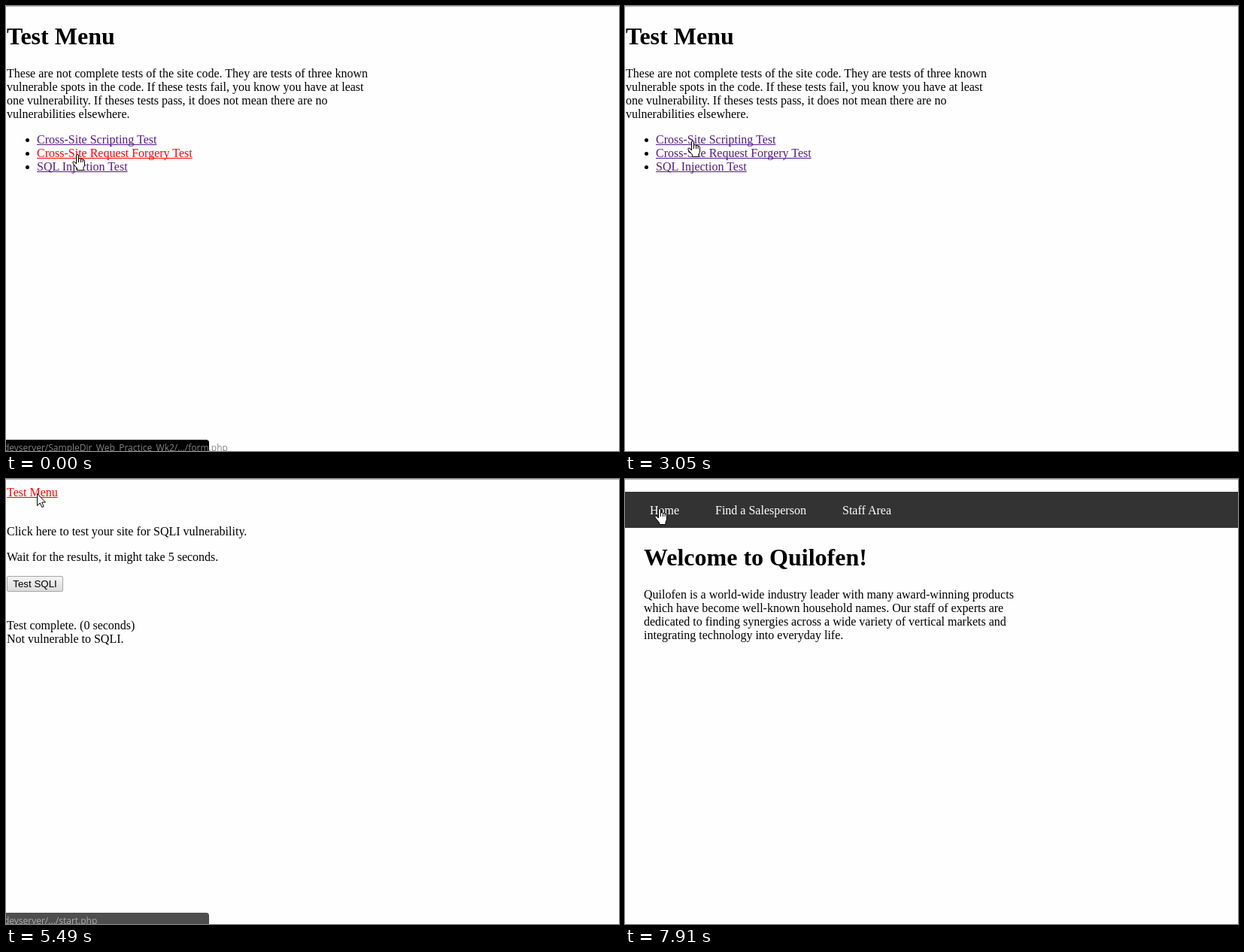
Write an HTML page that moves like this. It is 815 px wide and 592 px high and loops after 8 s.

```html
<!DOCTYPE html>
<html lang="en">
<head>
<meta charset="utf-8">
<title>Vulnerability test walkthrough</title>
<style>
  html, body { margin: 0; width: 100%; height: 100%; overflow: hidden; background: #fefefe; }
  #stage { position: relative; width: 815px; height: 592px; overflow: hidden; background: #fefefe;
    font: 16px/18px "Liberation Serif", serif; color: #000; white-space: nowrap; }
  #stage > *, .page > * { position: absolute; margin: 0; }
  .page { inset: 0; visibility: hidden; }
  .page.on { visibility: visible; }
  #topline { left: 0; top: 0; width: 100%; height: 1px; background: #b1b1b1; }
  h1 { font-size: 32px; line-height: 37px; }
  a { color: #551a8b; text-decoration: underline; text-decoration-skip-ink: none; }
  a.active { color: #f00; }
  li { list-style: none; position: relative; }
  li::before { content: ""; position: absolute; left: -15px; top: 7px; width: 5px; height: 5px; border-radius: 50%; background: #000; }
  .button { box-sizing: border-box; height: 21px; border: 1px solid #a6a6a6; border-radius: 2px;
    font: 13.333px/19px "Liberation Sans", sans-serif; text-align: center;
    background: linear-gradient(#f4f4f4, #dcdcdc); }
  .button.hover { border-color: #8c8c8c; background: linear-gradient(#f0f0f0, #e2e2e2); }
  .button.press { border-color: #8c8c8c; background: linear-gradient(#dcdcdc, #ececec); }
  nav { left: 0; top: 17px; width: 100%; height: 48px; background: #333; color: #fff; }
  nav span { position: absolute; top: 16px; }
  #status { left: 0; top: 577px; width: 270px; height: 20px; border-radius: 0 4px 0 0; background: #000;
    color: #858585; font: 12px/17px "Open Sans", sans-serif; }
  #status span { position: absolute; left: -3px; top: 2px; }
  #cursor { left: 0; top: 0; width: 20px; height: 24px; overflow: visible; }
  #cursor path { fill: #fff; stroke: #000; display: none; }
  #cursor path.on { display: inline; }
</style>
</head>
<body>
<div id="stage">
  <div class="page" id="menu">
    <h1 style="left:1px;top:22px">Test Menu</h1>
    <p style="left:1px;top:81px">These are not complete tests of the site code. They are tests of three known<br>vulnerable spots in the code. If these tests fail, you know you have at least<br>one vulnerability. If theses tests pass, it does not mean there are no<br>vulnerabilities elsewhere.</p>
    <ul style="left:41px;top:169px;padding:0">
      <li><a>Cross-Site Scripting Test</a></li>
      <li><a id="csrfLink">Cross-Site Request Forgery Test</a></li>
      <li><a id="sqliLink">SQL Injection Test</a></li>
    </ul>
  </div>
  <div class="page" id="csrf">
    <a class="back" style="left:1px;top:9px">Test Menu</a>
    <p style="left:1px;top:61px">Click here to test your site for CSRF vulnerability.</p>
    <div class="button" style="left:1px;top:95px;width:82px">Test CSRF</div>
    <p class="result" style="left:1px;top:152px">CSRF has not succeeded.</p>
  </div>
  <div class="page" id="sqli">
    <a class="back" style="left:1px;top:9px">Test Menu</a>
    <p style="left:1px;top:61px">Click here to test your site for SQLI vulnerability.</p>
    <p style="left:1px;top:95px">Wait for the results, it might take 5 seconds.</p>
    <div class="button" style="left:1px;top:129px;width:75px">Test SQLI</div>
    <p class="result" style="left:1px;top:186px">Test complete. (0 seconds)<br>Not vulnerable to SQLI.</p>
  </div>
  <div class="page" id="home">
    <nav><span style="left:33px">Home</span><span style="left:120px">Find a Salesperson</span><span style="left:289px">Staff Area</span></nav>
    <h1 style="left:25px;top:86px">Welcome to Quilofen!</h1>
    <p style="left:25px;top:145px">Quilofen is a world-wide industry leader with many award-winning products<br>which have become well-known household names. Our staff of experts are<br>dedicated to finding synergies across a wide variety of vertical markets and<br>integrating technology into everyday life.</p>
  </div>
  <div id="topline"></div>
  <div id="status"><span></span></div>
  <svg id="cursor">
    <path id="arrow" d="M.5.5V16.5L4.3 12.9 6.8 18.5 9.2 17.5 6.8 12H11.5Z"/>
    <path id="hand" d="M5.5 13V2q0-1.5 1.5-1.5T8.5 2V6q1.7-1 3 .6q1.7-.8 2.6.7q2.4-.5 2.4 2V14q0 2-1.5 4V21.5H6.5V19L2 13.5q-2.5-3.2 0-3.5q1.5 0 3.5 3M8.5 6v5M11.5 6.6v4.4M14.1 7.3v3.7"/>
    <path id="beam" d="M0 .5H3M4 .5H7M3.5 1V15M0 15.5H3M4 15.5H7"/>
  </svg>
</div>
<script>
const LOOP = 8000;
const $ = id => document.getElementById(id);
const all = selector => document.querySelectorAll(selector);

// Every track lists [start time, ...values]; values hold until the next entry.
const pages = [[0, "menu"], [120, "csrf"], [2660, "menu"], [3680, "sqli"], [5610, "menu"], [6810, "home"]];
const activeLinks = [[0, "csrfLink"], [120, ""], [2540, "back"], [2660, ""], [3560, "sqliLink"], [3680, ""], [5490, "back"], [5610, ""]];
const buttons = [[0, ""], [640, "hover"], [790, "press"], [910, "hover"], [1190, ""],
  [4160, "hover"], [4400, "press"], [4550, "hover"], [5220, ""]];
const results = [[0, false], [910, true], [2660, false], [4550, true], [5610, false]];

const HALF = 0.69;
const formPath = "devserver/SampleDir_Web_Practice_Wk2/.../form.php";
const startPath = "devserver/.../start.php";
const queryPath = "devserver/.../query.php";
const statuses = [[0, 1, formPath], [400, HALF, formPath], [520, 0, ""],
  [2420, HALF, startPath], [2540, 1, startPath], [2930, HALF, startPath], [3050, 0, ""],
  [3290, HALF, queryPath], [3440, 1, queryPath], [4160, HALF, queryPath], [4280, 0, ""],
  [5490, HALF, startPath], [5610, 1, startPath], [5980, HALF, startPath], [6100, 0, ""],
  [7640, 1, startPath], [7790, HALF, startPath], [7910, 0, ""]];

const cursors = [[0, "hand", 88, 197], [120, "arrow", 94, 197], [400, "arrow", 86, 170], [520, "arrow", 70, 130],
  [640, "arrow", 61, 108], [1190, "arrow", 57, 44], [1340, "arrow", 57, 36], [1460, "arrow", 56, 28],
  [1730, "arrow", 56, 27], [1880, "hand", 54, 9], [2000, "arrow", 56, 26], [2150, "arrow", 80, 62],
  [2270, "arrow", 99, 100], [2420, "hand", 54, 18], [2660, "arrow", 60, 18], [2780, "arrow", 62, 39],
  [2930, "arrow", 78, 110], [3050, "hand", 83, 179], [3170, "hand", 82, 196], [3290, "hand", 80, 208],
  [3680, "arrow", 86, 208], [3920, "arrow", 70, 180], [4040, "arrow", 54, 150], [4160, "arrow", 48, 134],
  [4280, "arrow", 48, 133], [4950, "arrow", 48, 136], [5070, "arrow", 48, 133], [5220, "arrow", 44, 70],
  [5340, "arrow", 42, 20], [5490, "arrow", 41, 19], [5860, "beam", 47, 16], [6380, "", 0, 0],
  [7090, "arrow", 325, 16], [7210, "arrow", 240, 72], [7330, "arrow", 153, 54], [7490, "arrow", 128, 49],
  [7640, "hand", 42, 42], [7790, "hand", 39, 39]];

const at = (track, time) => track.findLast(entry => entry[0] <= time).slice(1);

function draw(now) {
  const time = now % LOOP;
  const [page] = at(pages, time);
  const [link] = at(activeLinks, time);
  const [button] = at(buttons, time);
  const [result] = at(results, time);
  const [opacity, address] = at(statuses, time);
  const [shape, x, y] = at(cursors, time);

  all(".page").forEach(el => el.classList.toggle("on", el.id === page));
  all("a").forEach(el => el.classList.toggle("active", link !== "" && (el.id === link || el.className.includes(link))));
  all(".button").forEach(el => el.className = "button " + button);
  all(".result").forEach(el => el.style.display = result ? "block" : "none");
  $("status").style.opacity = opacity;
  $("status").firstChild.textContent = address;
  all("#cursor path").forEach(el => el.classList.toggle("on", el.id === shape));
  $("cursor").style.transform = `translate(${x}px, ${y}px)`;
  requestAnimationFrame(draw);
}
const begin = performance.now();
draw(0);
requestAnimationFrame(function tick() {});
</script>
</body>
</html>
```
